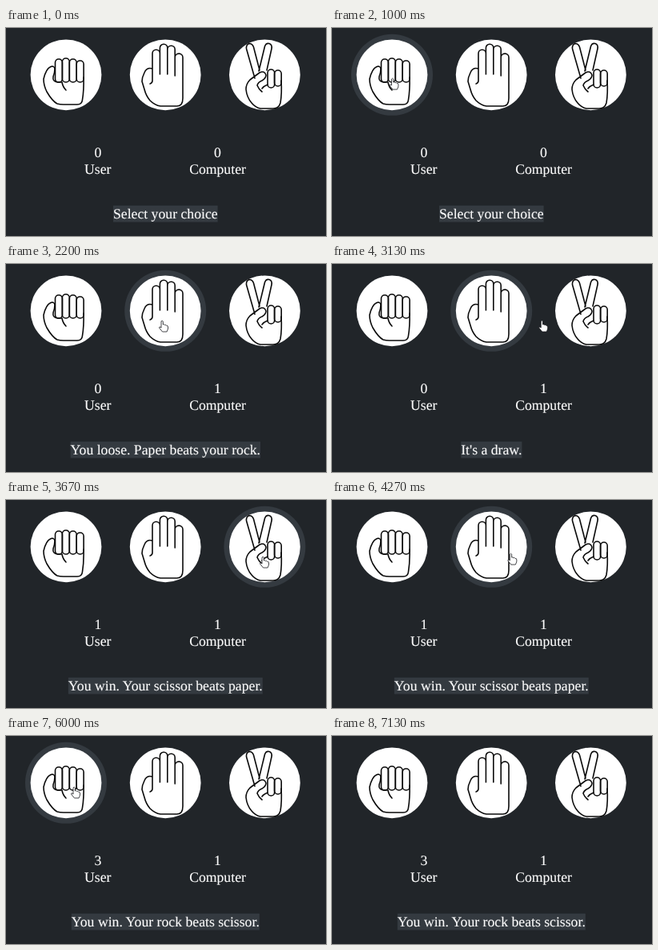
These frames come from a looping animation (400x261 px, 7200 ms). An HTML page:

```html
<!DOCTYPE html>
<html lang="en">
<head>
<meta charset="utf-8">
<title>Rock paper scissors</title>
<style>
html, body { margin: 0; width: 100%; height: 100%; overflow: hidden; background: #212529; }
svg { display: block; width: 100%; height: 100%; }
text {
  font: 17.7px "Liberation Serif", "Times New Roman", serif;
  fill: #fafafa; stroke: #fafafa; stroke-width: .15;
  text-anchor: middle; text-rendering: geometricPrecision;
}
.hand { fill: none; stroke: #0b0b0b; stroke-width: 1.6; stroke-linecap: round; stroke-linejoin: round; }
.ring, #mark { fill: #343a40; }
.disc { fill: #fff; }
#cursor path { fill: #fff; stroke: #17191c; stroke-width: .8; stroke-linejoin: round; }
</style>
</head>
<body>
<svg viewBox="0 0 400 261">
  <g id="choices"></g>
  <g class="hand">
    <g id="knuckles"></g>
    <path d="M61 51Q60 47 56 48.500Q50 51 47 64Q47 72 51 80Q58 92 64 95Q67 96 72 96H89Q95 96 95.500 90Q97.500 78 97 62M61 51Q61 56 59 61Q58 67 64 68H70Q71 74 75 78"/>
    <path d="M183 66V32a4.700 4.700 0 0 1 9.400 0V58M192.400 32V25a4.700 4.700 0 0 1 9.400 0V58M201.800 27a4.700 4.700 0 0 1 9.400 0V60M211.200 37a4.900 4.900 0 0 1 9.800 0V88Q221 98 214 98H193Q186 97 180 91Q175 85 173 77L170 67Q170 62 173 56Q176 49 183 51M183 66Q183 69 180 70"/>
    <path d="M311 63L300.500 26Q300 21 304 19.500Q308 19.500 309.500 24L317 53M316 54L323.500 23Q325 18.500 329 19.500Q333 21 332 26L326 53M344 66Q345 82 343 94Q341 101 334 101H318Q312 100 307 94Q301 87 300 77Q300 70 305 65L317 56Q323 53 325 59Q325 63 320 66Q315 68 314 72Q316 77 320 80M327 71Q322 73 320 76"/>
  </g>
  <text id="user" x="114.8" y="162"></text>
  <text x="114.8" y="183">User</text>
  <text id="computer" x="264.5" y="162"></text>
  <text x="264.5" y="183">Computer</text>
  <rect id="mark" y="222.8" height="20.7"/>
  <text id="message" x="199.3" y="239"></text>
  <g id="cursor">
    <path id="pointer" d="M0 1Q1.200-.8 2.300 1V5Q4 4.300 4.500 5.500Q6 5 6.500 6.200Q8.500 6 8.500 8V10Q8 12 7 14H1.500L-2.500 9Q-2.500 7.500-1 8L0 9z"/>
    <path id="arrow" d="M0 0V11L2.500 8.700L4.500 13L6.300 12.200L4.400 8H7.800z"/>
  </g>
</svg>
<script>
const LOOP = 7200, STEP = LOOP / 108, TRAVEL = 600;
const RADIUS = 44.4, CENTER_Y = 58.8;
const names = ["rock", "paper", "scissor"];
const $ = id => document.getElementById(id);
const centerX = i => 75 + 124.2 * i;

$("choices").innerHTML = names.map((_, i) => ["ring", "disc"].map(kind =>
  `<circle class="${kind}" cx="${centerX(i)}" cy="${CENTER_Y}" r="${kind === "ring" ? 51 : RADIUS}"/>`
).join("")).join("");
const rings = [...document.querySelectorAll(".ring")];

const capsule = (x, y, w, h) => `<rect x="${x}" y="${y}" width="${w}" height="${h}" rx="4.3"/>`;
$("knuckles").innerHTML =
  [39, 38, 39, 41].map((top, i) => capsule(61.5 + 8.9 * i, top, 8.9, 68 - top)).join("") +
  capsule(327, 52, 8.6, 23) + capsule(335.6, 53, 8.6, 20);

const clicks = [
  { at: 1460, user: "rock", computer: "paper" },
  { at: 2590, user: "paper", computer: "paper" },
  { at: 3650, user: "scissor", computer: "paper" },
  { at: 4720, user: "paper", computer: "rock" },
  { at: 5660, user: "rock", computer: "scissor" }
];

// Each move takes TRAVEL ms, then the cursor rests.
const entry = { x: -90, y: 90 };
const moves = [
  { at: 420, x: 75, y: 63 },
  { at: 1550, x: 194, y: 71 },
  { at: 2820, x: 320, y: 71 },
  { at: 3845, x: 196, y: 66 },
  { at: 4818, x: 84, y: 66 },
  { at: 5950, x: 84, y: -40 }
];

const beats = (a, b) => names.indexOf(a) === (names.indexOf(b) + 1) % 3;

function gameAt(t) {
  const game = { user: 0, computer: 0, message: "Select your choice" };
  for (const { at, user, computer } of clicks) {
    if (at > t) break;
    if (user === computer) {
      game.message = "It's a draw.";
    } else if (beats(user, computer)) {
      game.user++;
      game.message = `You win. Your ${user} beats ${computer}.`;
    } else {
      game.computer++;
      const winner = computer[0].toUpperCase() + computer.slice(1);
      game.message = `You loose. ${winner} beats your ${user}.`;
    }
  }
  return game;
}

function cursorAt(t) {
  return moves.reduce((from, to) => {
    const s = Math.min(1, Math.max(0, (t - to.at) / TRAVEL));
    const k = s * s * (3 - 2 * s);
    return { x: from.x + (to.x - from.x) * k, y: from.y + (to.y - from.y) * k };
  }, entry);
}

function choiceAt(t) {
  const { x, y } = cursorAt(t);
  return names.findIndex((_, i) => Math.hypot(x - centerX(i), y - CENTER_Y) < RADIUS);
}

function show(el, visible) {
  el.setAttribute("visibility", visible ? "visible" : "hidden");
}

function draw(time) {
  const t = Math.floor((time % LOOP + 5) / STEP) * STEP % LOOP;
  const game = gameAt(t);
  for (const id in game) $(id).textContent = game[id];
  const width = $("message").getComputedTextLength();
  $("mark").setAttribute("x", 199.3 - width / 2);
  $("mark").setAttribute("width", width);

  // A ring lingers for one step, and the cursor shape follows one step late.
  const now = choiceAt(t), before = choiceAt(t - STEP);
  const hovered = now < 0 ? before : now;
  rings.forEach((ring, i) => show(ring, i === hovered));
  show($("pointer"), before >= 0);
  show($("arrow"), before < 0);
  const { x, y } = cursorAt(t);
  $("cursor").setAttribute("transform", `translate(${x} ${y})`);
}

const start = performance.now();
function tick() {
  draw(performance.now() - start);
  requestAnimationFrame(tick);
}
tick();
</script>
</body>
</html>
```
